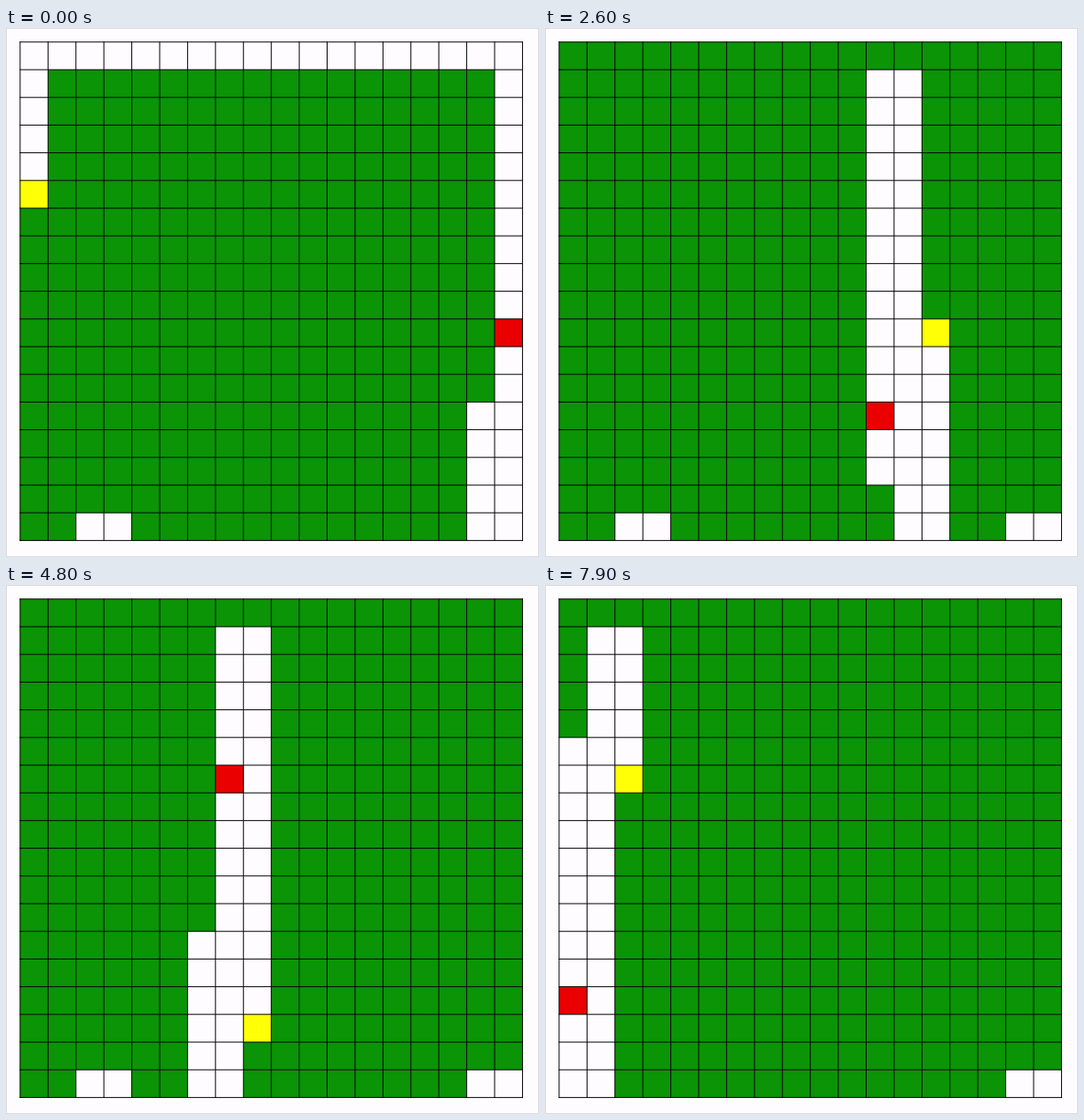
These frames come from a looping animation (600 by 596 pixels, 8000 ms). An HTML page with a canvas:

```html
<!DOCTYPE html>
<html lang="en">
<head>
<meta charset="utf-8">
<title>Snake on a grid</title>
<style>
  html, body { margin: 0; width: 100%; height: 100%; overflow: hidden; background: #fefcfe; }
  canvas { display: block; }
</style>
</head>
<body>
<canvas id="stage" width="600" height="596"></canvas>
<script>
const ctx = document.getElementById('stage').getContext('2d');
const N = 18, TICK = 100, TICKS = 80;
const GREEN = '#0a9406', YELLOW = '#ffff05', RED = '#ea0000';
const TAIL = 22, HEAD = 299; // path positions at the start

// One lap: down odd columns, up even ones, then back along the top row.
// The column pair starting at `cut` skips its bottom row.
function lap(cut) {
  const cells = [];
  for (let x = N - 1; x >= 0; x--) {
    const bottom = x === cut || x === cut + 1 ? N - 2 : N - 1;
    for (let i = 1; i <= bottom; i++) cells.push([x, x % 2 ? i : bottom + 1 - i]);
  }
  for (let x = 0; x < N; x++) cells.push([x, 0]);
  return cells;
}
const path = [...lap(2), ...lap(16)];

const foods = [[17, 10], [15, 8], [13, 9], [11, 13], [9, 11], [7, 6], [5, 4], [4, 9], [2, 10], [0, 14]]
  .map(([x, y]) => {
    const at = path.findIndex((c, i) => i > HEAD && c[0] === x && c[1] === y);
    return { x, y, at: at < 0 ? Infinity : at };
  });

// [tick, cells travelled]
const pace = [[0, 0], [15, 55], [26, 98], [40, 149], [48, 176], [60, 218], [79, 287]];
function travelled(tick) {
  const k = Math.max(1, pace.findIndex(p => p[0] >= tick));
  const [t0, s0] = pace[k - 1], [t1, s1] = pace[k];
  return Math.round(s0 + (s1 - s0) * (tick - t0) / (t1 - t0));
}

// Centres of the grid lines, left unrounded so that they are drawn soft.
const lineX = i => 15.9 + 31.42 * i;
const lineY = i => 15.8 + 31.2 * i;

function cell(x, y, color) {
  ctx.fillStyle = color;
  ctx.fillRect(lineX(x), lineY(y), lineX(1) - lineX(0), lineY(1) - lineY(0));
}

function drawGrid() {
  ctx.strokeStyle = '#000';
  ctx.lineCap = 'square';
  ctx.beginPath();
  for (let i = 0; i <= N; i++) {
    ctx.moveTo(lineX(i), lineY(0));
    ctx.lineTo(lineX(i), lineY(N));
    ctx.moveTo(lineX(0), lineY(i));
    ctx.lineTo(lineX(N), lineY(i));
  }
  ctx.stroke();
}

function draw(tick) {
  const steps = travelled(tick), head = HEAD + steps;
  const eaten = foods.filter(f => f.at <= head).length;
  const food = foods[eaten];

  ctx.fillStyle = '#fefcfe';
  ctx.fillRect(0, 0, 600, 596);
  ctx.strokeStyle = '#dcdadc';
  ctx.strokeRect(0.5, 0.5, 599, 595);

  for (let i = TAIL + steps - eaten; i < head; i++) cell(...path[i], GREEN);
  if (food) cell(food.x, food.y, RED);
  cell(...path[head], YELLOW);
  drawGrid();
}

const start = performance.now();
function frame() {
  draw(Math.floor((performance.now() - start) / TICK) % TICKS);
  requestAnimationFrame(frame);
}
frame();
</script>
</body>
</html>
```
